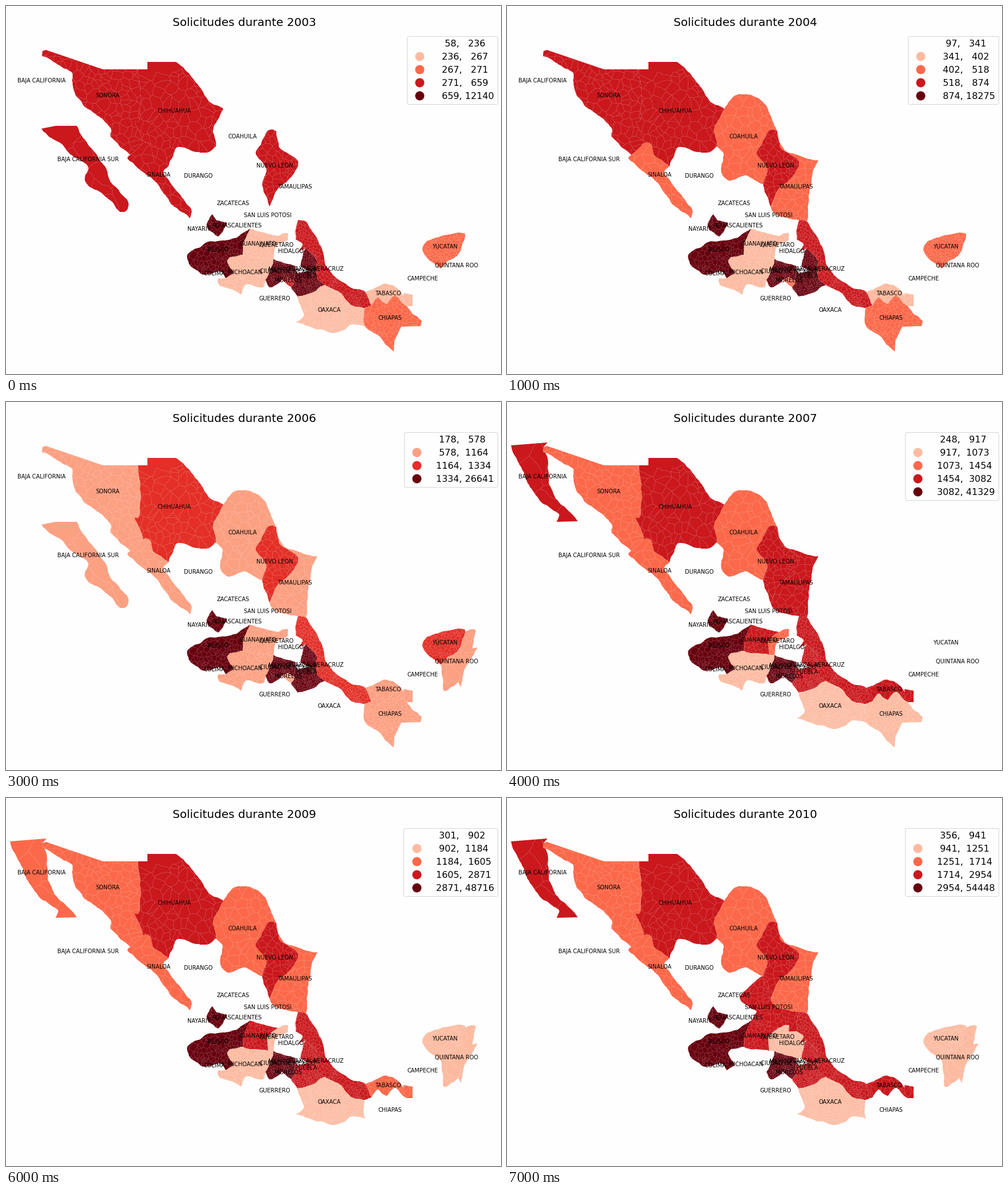
A matplotlib script for the animation above (8000 ms loop, 868x645 px).

```python
import numpy as np
import matplotlib.pyplot as plt
from matplotlib.animation import FuncAnimation
from matplotlib.collections import LineCollection
from matplotlib.lines import Line2D
from matplotlib.patches import Polygon
from matplotlib.tri import Triangulation

W, H, DPI = 868, 645, 72
PAPER = "#fefefe"

plt.rcParams["font.family"] = "DejaVu Sans"
fig = plt.figure(figsize=(W / DPI, H / DPI), dpi=DPI, facecolor=PAPER)
ax = fig.add_axes([0, 0, 1, 1])
ax.set_xlim(0, W)
ax.set_ylim(H, 0)
ax.axis("off")

regions = []


def ragged(p, rng, amp, levels):
    """Subdivide curves (..., points, 2) smoothly, shaking each new point."""
    for _ in range(levels):
        a, b = p[..., :-1, :], p[..., 1:, :]
        ext = np.concatenate([2 * p[..., :1, :] - p[..., 1:2, :], p,
                              2 * p[..., -1:, :] - p[..., -2:-1, :]], axis=-2)
        mid = (9 * (a + b) - ext[..., :-3, :] - ext[..., 3:, :]) / 16
        size = np.linalg.norm(b - a, axis=-1, keepdims=True)
        mid = mid + rng.uniform(-amp, amp, mid.shape) * size
        out = np.empty(p.shape[:-2] + (2 * p.shape[-2] - 1, 2))
        out[..., ::2, :], out[..., 1::2, :] = p, mid
        p = out
    return p


def line(*xy):
    return np.reshape(xy, (-1, 2)).astype(float)


def arc(*xy):
    """A natural border or coast through a few key points."""
    return ragged(line(*xy), np.random.default_rng(sum(xy)), 0.07, 4)


def cell_lines(poly, count, seed):
    """Voronoi edges over the polygon's box, about count cells inside it."""
    rng = np.random.default_rng(seed)
    lo, hi = poly.min(0) - 5, poly.max(0) + 5
    x, y = poly.T
    area = abs(np.dot(x, np.roll(y, 1)) - np.dot(y, np.roll(x, 1))) / 2
    p = rng.uniform(lo, hi, (int(count * np.prod(hi - lo) / area) + 4, 2))
    tri = Triangulation(*p.T)
    a, b, c = (p[tri.triangles[:, i]] for i in range(3))
    b, c = b - a, c - a
    bb, cc = (b ** 2).sum(1), (c ** 2).sum(1)
    det = 2 * (b[:, 0] * c[:, 1] - b[:, 1] * c[:, 0])
    hub = a + np.column_stack([c[:, 1] * bb - b[:, 1] * cc,
                               b[:, 0] * cc - c[:, 0] * bb]) / det[:, None]
    inside = ((hub > lo - 30) & (hub < hi + 30)).all(1)
    edges = [hub[[i, j]] for i, row in enumerate(tri.neighbors)
             for j in row if j > i and inside[i] and inside[j]]
    return ragged(np.array(edges), rng, 0.1, 2)


def region(key, count, *arcs):
    outline = np.vstack(arcs)
    shape = Polygon(outline, lw=0)
    ax.add_patch(shape)
    mesh = LineCollection(cell_lines(outline, count, len(regions)),
                          colors="white", linewidths=0.65, alpha=0.27)
    ax.add_collection(mesh, autolim=False)
    mesh.set_clip_path(shape)
    regions.append((key, shape, mesh))


# Shared borders
son_chih = arc(231, 111, 236, 160, 233, 201, 226, 204, 240, 240)
son_sin = arc(240, 240, 218, 261)
chih_sin = arc(240, 240, 253, 243, 258, 262, 285, 281)
chih_coah = arc(381, 180, 364, 213, 368, 246)
coah_nl = arc(474, 219, 463, 217, 450, 234, 438, 259, 456, 284, 449, 312)
nl_tam = arc(474, 219, 480, 249, 509, 268, 510, 285, 482, 315, 462, 351)
nl_slp = arc(449, 312, 457, 335, 462, 351)
tam_slp = arc(462, 351, 471, 364, 512, 375)
slp_ver = arc(512, 375, 508, 409)
slp_gto = arc(428, 390, 452, 397, 477, 403)
slp_qro = arc(477, 403, 494, 398, 494, 410)
slp_hgo = arc(494, 410, 508, 409)
gto_qro = arc(477, 403, 458, 418, 460, 443)
gto_mich = arc(460, 443, 436, 440, 415, 436)
gto_jal = arc(428, 390, 416, 415, 415, 436)
jal_mich = arc(415, 436, 388, 446, 399, 467, 386, 477)
mich_qro = arc(460, 443, 469, 443)
qro_hgo = arc(494, 410, 472, 425, 469, 443)
mich_mex = arc(469, 443, 455, 480)
mich_gro = arc(455, 480, 450, 493, 421, 488, 412, 506)
mex_gro = arc(455, 480, 463, 493, 484, 480)
hgo_mex = arc(469, 443, 494, 452, 508, 456)
mex_mor = arc(484, 480, 495, 475, 507, 482)
mor_gro = arc(484, 480, 500, 493)
mor_pue = arc(507, 482, 500, 493)
mex_pue = arc(507, 482, 507, 463)
pue_hgo = arc(526, 424, 520, 440, 516, 456)
hgo_ver = arc(508, 409, 520, 418, 512, 431, 526, 424)
pue_ver = arc(526, 424, 545, 446, 545, 475, 559, 489)
pue_oax = arc(559, 489, 535, 503, 511, 509)
pue_gro = arc(500, 493, 511, 509)
gro_oax = arc(511, 509, 522, 539, 508, 554)
ver_oax = arc(559, 489, 582, 500, 602, 521, 629, 529)
oax_chis = arc(629, 529, 627, 547, 630, 562)
ver_chis = arc(629, 529, 641, 525)
ver_tab = arc(641, 525, 630, 501)
tab_chis = arc(641, 525, 652, 511, 668, 522, 682, 508, 703, 526)
yuc_roo = arc(805, 402, 795, 432, 762, 460)

# States: key, number of municipalities, outline
region("BC", 5, line(7, 76, 71, 71), arc(64, 79, 72, 105, 74, 145, 95, 180, 124, 209),
       arc(87, 210, 90, 195, 50, 163, 20, 106, 7, 76))
region("BCS", 5, arc(124, 210, 137, 233, 164, 270, 187, 313, 215, 348, 201, 361, 186, 343,
                     140, 309, 143, 280, 100, 244, 62, 215), line(87, 210))
region("SON", 72, line(64, 79, 70, 77, 170, 111), son_chih, son_sin,
       arc(218, 261, 184, 230, 183, 213, 140, 178, 117, 139, 116, 117, 95, 105, 63, 88))
region("CHIH", 67, son_chih[::-1], line(248, 111, 248, 98),
       arc(298, 98, 335, 136, 353, 163, 381, 180), chih_coah,
       arc(368, 246, 346, 257, 304, 247, 285, 281), chih_sin[::-1])
region("SIN", 18, chih_sin, arc(285, 281, 276, 292, 295, 319, 323, 353, 322, 372),
       arc(322, 372, 288, 345, 250, 298, 215, 270, 218, 261), son_sin[::-1])
region("COAH", 38, chih_coah[::-1], arc(381, 180, 400, 157, 432, 158, 461, 190, 474, 219), coah_nl,
       arc(449, 312, 420, 297, 390, 306, 376, 292, 380, 260, 368, 246))
region("NL", 51, nl_tam, nl_slp[::-1], coah_nl[::-1])
region("TAM", 43, arc(474, 219, 494, 257, 546, 270), arc(546, 270, 531, 320, 526, 378),
       tam_slp[::-1], nl_tam[::-1])
region("SLP", 58, nl_slp, tam_slp, slp_ver, slp_hgo[::-1], slp_qro[::-1], slp_gto[::-1],
       arc(428, 390, 437, 373, 408, 350, 449, 312))
region("JAL", 100, gto_jal, jal_mich,
       arc(386, 477, 374, 465, 343, 470, 318, 436, 355, 413, 390, 410, 428, 390))
region("JAL", 20, arc(362, 365, 370, 376, 387, 380, 372, 404), arc(372, 404, 352, 385, 362, 365))
region("GTO", 46, slp_gto, gto_qro, gto_mich, gto_jal[::-1])
region("QRO", 18, slp_qro, qro_hgo, mich_qro[::-1], gto_qro[::-1])
region("HGO", 84, slp_hgo, hgo_ver, pue_hgo, hgo_mex[::-1], qro_hgo[::-1])
region("MICH", 113, jal_mich[::-1], gto_mich[::-1], mich_qro, mich_mex, mich_gro,
       arc(412, 506, 376, 491, 372, 478, 386, 477))
region("MEX", 140, hgo_mex, mex_pue[::-1], mex_mor[::-1], mex_gro[::-1], mich_mex[::-1])
region("MOR", 33, mex_mor, mor_pue, mor_gro[::-1])
region("GRO", 81, mich_gro[::-1], mex_gro, mor_gro, pue_gro, gro_oax,
       arc(508, 554, 450, 530, 412, 506))
region("PUE", 217, pue_ver, pue_oax, pue_gro[::-1], mor_pue[::-1], mex_pue,
       line(512, 469, 530, 464), pue_hgo[::-1])
region("VER", 212, arc(512, 375, 526, 378, 541, 400, 558, 443, 590, 484, 630, 501),
       ver_tab[::-1], ver_chis[::-1], ver_oax[::-1], pue_ver[::-1], hgo_ver[::-1], slp_ver[::-1])
region("OAX", 570, ver_oax, oax_chis, arc(630, 562, 606, 558, 570, 573, 508, 554),
       gro_oax[::-1], pue_oax[::-1])
region("TAB", 17, arc(630, 501, 668, 487, 697, 508), line(697, 503, 713, 506, 713, 526),
       tab_chis[::-1], ver_tab)
region("CHIS", 118, tab_chis, arc(703, 526, 713, 540, 729, 552), line(727, 561, 693, 562, 681, 587),
       arc(680, 606, 665, 593, 630, 562), oax_chis[::-1], ver_chis)
region("YUC", 106, arc(762, 460, 730, 426, 748, 408, 805, 399), yuc_roo)
region("ROO", 8, arc(805, 402, 824, 401, 818, 431, 826, 432, 803, 472, 798, 500),
       arc(793, 491, 768, 506, 762, 460), yuc_roo[::-1])

labels = [
    ("BAJA CALIFORNIA", 62, 130.5), ("SONORA", 178, 156.5), ("CHIHUAHUA", 295, 183),
    ("COAHUILA", 415, 228), ("BAJA CALIFORNIA SUR", 143.5, 268), ("SINALOA", 267.5, 295),
    ("DURANGO", 337.5, 297.5), ("NUEVO LEON", 471, 279), ("TAMAULIPAS", 506.5, 316),
    ("ZACATECAS", 398, 345.5), ("SAN LUIS POTOSI", 459, 366), ("NAYARIT", 338.5, 390),
    ("AGUASCALIENTES", 406, 384), ("JALISCO", 372, 426), ("GUANAJUATO", 442, 416.5),
    ("QUERETARO", 475, 418), ("HIDALGO", 499.5, 429), ("COLIMA", 365, 468),
    ("MICHOACAN", 419, 466.5), ("CIUDAD DE MEXICO", 493.5, 464), ("MEXICO", 479, 461),
    ("TLAXCALA", 519.5, 460), ("VERACRUZ", 566, 460.5), ("PUEBLA", 526, 472),
    ("MORELOS", 495, 480), ("GUERRERO", 471.5, 512), ("OAXACA", 566.5, 532.5),
    ("TABASCO", 670, 503.5), ("CHIAPAS", 673, 546.5), ("CAMPECHE", 730.5, 477),
    ("YUCATAN", 769.5, 421.5), ("QUINTANA ROO", 790.5, 454),
]
for name, x, y in labels:
    ax.text(x, y + 3.6, name, size=9.8, ha="center", va="baseline", zorder=5)
title = ax.text(417.5, 34.8, "", size=20, ha="center", va="baseline")

# Class limits, then the states of each class above the lowest
years = [
    ([58, 236, 267, 271, 659, 12140],
     ["GTO QRO MICH OAX TAB", "CHIS YUC", "BCS SON CHIH SIN NL MOR VER", "JAL MEX PUE"]),
    ([97, 341, 402, 518, 874, 18275],
     ["GTO QRO MICH TAB", "SIN COAH TAM MOR CHIS YUC", "SON CHIH NL VER", "JAL MEX PUE"]),
    ([147, 501, 535, 796, 1150, 23485],
     ["MICH OAX ROO", "SIN COAH TAM MOR TAB CHIS YUC", "BC SON CHIH GRO VER", "NL GTO MEX PUE"]),
    ([178, 578, 1164, 1334, 26641],
     ["BCS SON SIN COAH TAM GTO QRO MICH MOR TAB CHIS ROO", "CHIH NL VER YUC", "JAL MEX PUE"]),
    ([248, 917, 1073, 1454, 3082, 41329],
     ["MICH OAX CHIS", "SON SIN COAH QRO", "BC CHIH NL TAM GTO PUE VER TAB", "JAL MEX MOR"]),
    ([233, 1103, 1726, 2773, 43882],
     ["SIN COAH TAM SLP QRO MICH TAB CHIS", "BC SON CHIH NL GTO PUE VER", "JAL MEX MOR"]),
    ([301, 902, 1184, 1605, 2871, 48716],
     ["QRO MICH OAX YUC ROO", "BC SON SIN COAH TAM TAB", "CHIH NL GTO PUE VER", "JAL MEX MOR"]),
    ([356, 941, 1251, 1714, 2954, 54448],
     ["QRO HGO OAX YUC ROO", "SON SIN COAH TAM", "BC CHIH NL SLP GTO PUE VER TAB", "JAL MEX MOR"]),
]


def draw(i):
    limits, groups = years[i]
    title.set_text(f"Solicitudes durante {2003 + i}")
    colors = [PAPER] + [plt.cm.Reds((k + 1) / len(groups)) for k in range(len(groups))]
    fill = {key: c for group, c in zip(groups, colors[1:]) for key in group.split()}
    for key, shape, mesh in regions:
        shape.set_visible(key in fill)
        mesh.set_visible(key in fill)
        shape.set_facecolor(fill.get(key, PAPER))
    handles = [Line2D([], [], ls="none", marker="o", ms=16, mew=0, color=c,
                      label=f"{lo:>5}, {hi:>5}")
               for c, lo, hi in zip(colors, limits, limits[1:])]
    ax.legend(handles=handles, fontsize=16, loc="upper right", borderaxespad=0,
              bbox_to_anchor=(862, 52.5), bbox_transform=ax.transData)


anim = FuncAnimation(fig, draw, frames=len(years), init_func=lambda: None,
                     interval=1000, repeat=True, repeat_delay=0)
plt.show()
```
